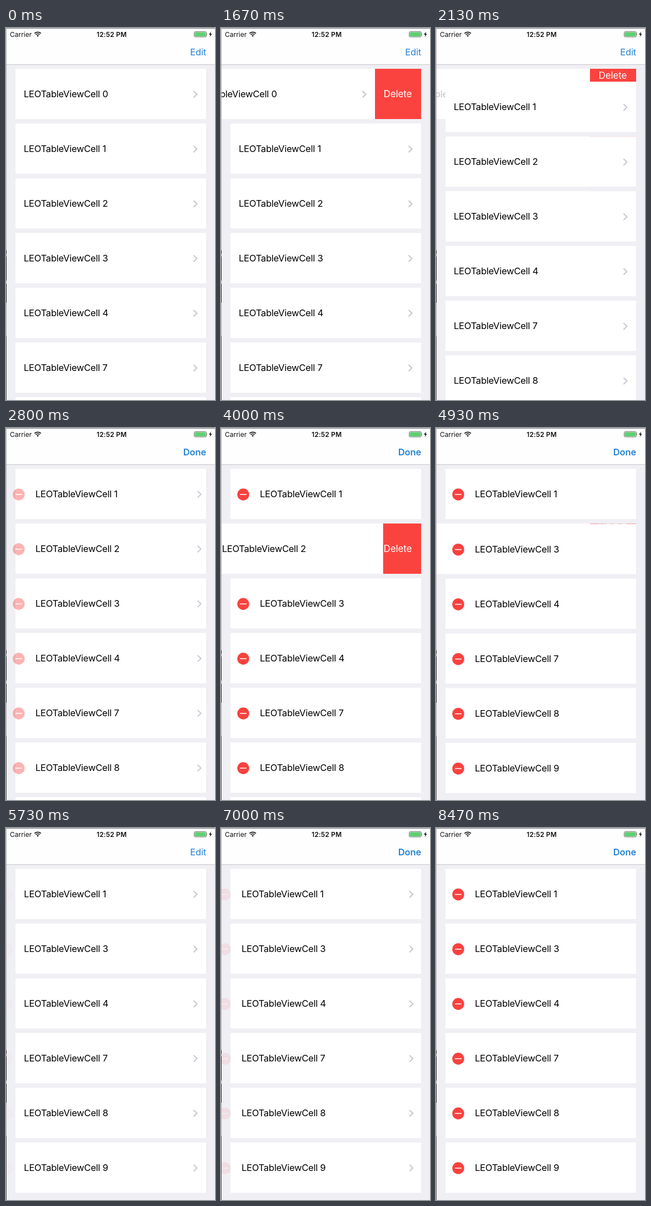
An HTML page that plays this animation: 376 by 666 pixels, repeating every 8.54 s.

```html
<!DOCTYPE html>
<html lang="en">
<head>
<meta charset="utf-8">
<title>Table view editing</title>
<style>
  html, body { margin: 0; width: 100%; height: 100%; overflow: hidden; background: #efeff4; }
  svg { display: block; }
  #stage { width: 376px; height: 666px; }
  text { font-family: Inter, Roboto, sans-serif; white-space: pre; }
  .label { font-size: 16.5px; letter-spacing: -.24px; fill: #000; }
  .button { font-size: 16.5px; letter-spacing: -.15px; fill: #2583d5; text-anchor: end; }
  .delete { font-size: 17px; letter-spacing: -.1px; fill: #fff; }
  .status { font-size: 12px; fill: #111; }
  .line { fill: none; stroke: #c7c7cc; stroke-width: 2; }
</style>
</head>
<body>
<svg id="stage" viewBox="0 0 376 666">
  <rect width="376" height="666" fill="#efeff4"/>
  <g id="rows"></g>

  <rect width="376" height="65" fill="#fefefe"/>
  <rect y="65" width="376" height="1" fill="#c6c6ca"/>
  <text class="button" id="edit" x="360" y="49">Edit</text>
  <text class="button" id="done" x="360" y="49" font-weight="600">Done</text>

  <text class="status" x="7" y="15.5">Carrier</text>
  <g fill="none" stroke="#111" stroke-width="1.7">
    <path d="M51.3 9.6a8.4 8.4 0 0 1 11.6 0M53.4 12a5.3 5.3 0 0 1 7.4 0"/>
    <path d="M57.1 15.7l-1.9-2a2.7 2.7 0 0 1 3.8 0z" fill="#111" stroke="none"/>
  </g>
  <text class="status" x="163" y="15.5" font-weight="600" letter-spacing=".15">12:52 PM</text>
  <rect x="338.5" y="6.5" width="22" height="9.5" rx="2" fill="#fff" stroke="#777"/>
  <rect x="339.5" y="7.5" width="20" height="7.5" rx="1" fill="#5fcf73"/>
  <path d="M361.5 9.5q1.6 1.7 0 3.5z" fill="#777"/>
  <path d="M369 6.5l-4 5.2h2.5l-1 4.3 4.2-5.6h-2.6z" fill="#111"/>

  <rect width="376" height="1" fill="#777"/>
  <g id="edge"></g>
</svg>
<script>
const LOOP = 8540, STEP = 1000 / 15;
const TOP = 73, PITCH = 98, HEIGHT = 90, REVEAL = 83, INDENT = 38;
const NUMBERS = [0, 1, 2, 3, 4, 7, 8, 9];

const byId = id => document.getElementById(id);

function add(parent, tag, attrs, content) {
  const node = document.createElementNS('http://www.w3.org/2000/svg', tag);
  for (const name in attrs) node.setAttribute(name, attrs[name]);
  if (content) node.textContent = content;
  return parent.appendChild(node);
}

const move = (node, x, y = 0) => node.setAttribute('transform', `translate(${x} ${y})`);

// Eased progress from 0 to 1
function ramp(t, start, duration) {
  const p = Math.min(1, Math.max(0, (t - start) / duration));
  return p * p * (3 - 2 * p);
}

const within = (t, ranges) => ranges.some(([from, to]) => t >= from && t < to);

function makeRow(number, index) {
  const group = add(byId('rows'), 'g', {});
  const row = { index, group };
  if (index === 0 || index === 2) {
    row.action = add(group, 'svg', { x: 277, y: 0, width: REVEAL, height: HEIGHT, overflow: 'hidden' });
    add(row.action, 'rect', { width: REVEAL, height: HEIGHT, fill: '#fa433f' });
    row.actionText = add(row.action, 'text', { class: 'delete', x: 15.5, y: 51 }, 'Delete');
  }
  row.card = add(group, 'g', {});
  add(row.card, 'rect', { x: 17, width: 343, height: HEIGHT, fill: '#fff' });
  row.content = add(row.card, 'g', {});
  row.minus = add(row.content, 'g', {});
  add(row.minus, 'circle', { cx: 40, cy: 46, r: 10.7, fill: '#f7423f' });
  add(row.minus, 'rect', { x: 34, y: 45.2, width: 12, height: 1.5, fill: '#fff' });
  row.label = add(row.content, 'text', { class: 'label', x: 32, y: 51 }, 'LEOTableViewCell ' + number);
  row.chevron = add(row.content, 'path', { class: 'line', d: 'M337.5 40l6 5.7-6 5.7' });
  return row;
}

// Removed rows are drawn first so that the others slide over them
const rows = [0, 2, 1, 3, 4, 5, 6, 7].map(i => makeRow(NUMBERS[i], i));

// Sliver of desktop showing at the left side: [start, end, colour]
for (const [y, end, fill] of [
  [0, 398, '#b4b4b6'], [398, 404, '#2b2b2e'], [404, 409, '#999'], [409, 452, '#2b2b2e'],
  [452, 458, '#aaa'], [458, 492, '#2b2b2e'], [492, 552, '#aaa'], [552, 666, '#555'],
]) add(byId('edge'), 'rect', { y, width: 1, height: end - y, fill });

function render(t) {
  const editing = ramp(t, 2640, 300) - ramp(t, 5450, 300) + ramp(t, 6932, 300);
  const open = { 0: ramp(t, 900, 550), 2: ramp(t, 3707, 400) };
  const removed = { 0: ramp(t, 1860, 400), 2: ramp(t, 4553, 400) };

  for (const row of rows) {
    const i = row.index;
    const shift = (i > 0 ? removed[0] : 0) + (i > 2 ? removed[2] : 0);
    move(row.group, 0, TOP + PITCH * (i - shift));
    move(row.card, -REVEAL * (open[i] || 0));
    move(row.minus, INDENT * (editing - 1));
    move(row.label, INDENT * editing);
    move(row.chevron, 13 * editing);
    row.minus.setAttribute('opacity', .7 * editing + .3 * editing ** 6);
    row.chevron.setAttribute('opacity', 1 - editing ** 4);

    if (row.action) {
      const height = Math.min(HEIGHT, PITCH * (1 - removed[i]));
      row.action.setAttribute('height', height);
      row.actionText.setAttribute('y', height / 2 + 6);
      row.content.setAttribute('opacity', 1 - removed[i]);
      row.group.style.display = removed[i] < 1 ? '' : 'none';
    }
  }

  const isDone = within(t, [[2600, 5430], [6900, LOOP]]);
  const pressed = within(t, [[2470, 2600], [5300, 5430], [6600, 6800]]);
  byId('done').style.display = isDone ? '' : 'none';
  byId('edit').style.display = isDone ? 'none' : '';
  byId('done').style.opacity = byId('edit').style.opacity = pressed ? .35 : 1;
}

const started = performance.now();
function tick() {
  const t = (performance.now() - started) % LOOP;
  render(Math.floor((t + 5) / STEP) * STEP);
  requestAnimationFrame(tick);
}
tick();
</script>
</body>
</html>
```
